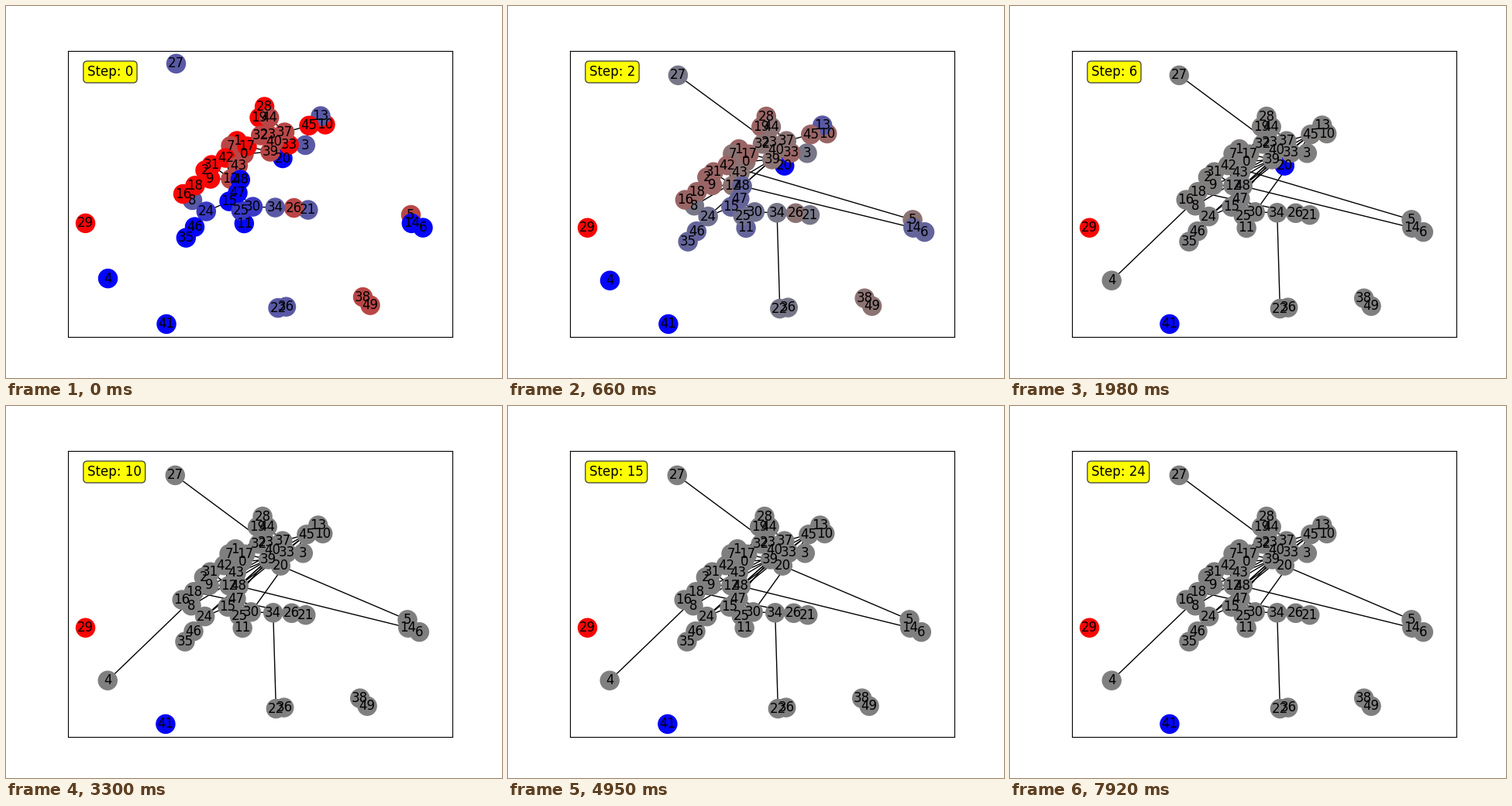
A matplotlib script that plays this animation: 640x480 px, repeating every 8 s.

```python
import itertools
import numpy as np
import matplotlib.pyplot as plt
from matplotlib.animation import FuncAnimation
from matplotlib.collections import LineCollection

plt.rcParams["font.family"] = "DejaVu Sans"

LOOP, TICK, STEP = 8000, 40, 330
REACH = 34.3        # nodes closer than this start out linked
DECAY = .47         # share of an opinion kept per step
NEVER = 99

# the layout: one place per node, y downwards
XY = np.array([
    (307, 191), (298, 174), (257, 212), (386.3, 179.5), (131.5, 351.5),
    (522.5, 269.5), (538, 286), (290, 180.5), (240.5, 250.5), (263.7, 223),
    (412, 153), (307.3, 280.5), (290, 223.3), (406, 142), (523.3, 280.3),
    (288, 252), (228.5, 242.5), (311, 181), (244, 231.7), (327, 144),
    (357, 196.5), (389.8, 263), (351, 389.5), (338, 165.5), (258.3, 265),
    (303.3, 264), (371.5, 260.5), (219.5, 74.4), (333.5, 130), (102.5, 280.3),
    (318.5, 259), (265.3, 205), (328.7, 167), (365.2, 179), (347.3, 260),
    (232.3, 299), (361.5, 388), (359.5, 163), (460.5, 375.5), (341, 188),
    (346, 175), (207, 410.3), (283.3, 196), (299.3, 206), (339.7, 144),
    (391, 154.3), (243.5, 285), (299, 241), (302.3, 224), (470, 386),
]) * (1, -1)

# opinions run from -1 (blue) over 0 (grey) to 1 (red); most nodes are red
OPINION = np.full(len(XY), .95)
OPINION[[0, 5, 7, 12, 23, 26, 32, 37, 38, 39, 40, 43, 44, 49]] = .45
OPINION[[3, 8, 13, 21, 22, 27, 34, 36]] = -.3
OPINION[[24, 25, 30]] = -.55
OPINION[[4, 6, 11, 14, 15, 20, 35, 41, 46, 47, 48]] = -.96

# step at which a node that starts alone finds company
JOIN = {4: 3, 13: 3, 20: 7, 29: NEVER, 41: NEVER}


def near_links():
    return [(a, b) for a, b in itertools.combinations(range(len(XY)), 2)
            if 20 not in (a, b) and np.hypot(*(XY[a] - XY[b])) < REACH]


def fan(left, right):
    return list(itertools.product(left, right))


# links that appear at each step
LINKS = {
    0: near_links(),
    1: [(48, 14), (34, 22)],
    2: [(27, 23)] + fan((8, 24, 48), (39,)),
    3: [(4, 44), (18, 26), (30, 45)] + fan((9, 15), (39,)) + fan((24, 43, 48), (45,)),
}


def links_at(step):
    pairs = [p for start, group in LINKS.items() if start <= step for p in group]
    if step > 0:
        pairs.append((42, 5) if step < JOIN[20] else (20, 5))
    return pairs


def opinions_at(step):
    now = OPINION * DECAY ** step
    for node, join in JOIN.items():
        now[node] = OPINION[node] * .05 ** max(0, step - join + 1)
    return now


def colours(op):
    grey = .5 * (1 - np.abs(op))
    red = np.where(op > 0, .5 + .5 * op, grey)
    blue = np.where(op < 0, .5 - .5 * op, grey)
    return np.column_stack([red, grey, blue])


def view(pairs):
    """Limits around all nodes and the padded box of the links."""
    ends = XY[np.array(pairs).ravel()]
    lo, hi = ends.min(axis=0), ends.max(axis=0)
    pad = .05 * (hi - lo)
    lo = np.minimum(XY.min(axis=0), lo - pad)
    hi = np.maximum(XY.max(axis=0), hi + pad)
    margin = .05 * (hi - lo)
    return lo - margin, hi + margin


fig, ax = plt.subplots(figsize=(6.4, 4.8), dpi=100)
ax.set_xticks([])
ax.set_yticks([])
lines = ax.add_collection(LineCollection([], colors="black", linewidths=1, zorder=1))
dots = ax.scatter(*XY.T, s=300, c=colours(OPINION), zorder=2)
for i, (x, y) in enumerate(XY):
    ax.text(x, y, str(i), size=12, ha="center", va="center", zorder=3)
label = ax.text(.05, .95, "", transform=ax.transAxes, size=12, va="top", zorder=4,
                bbox=dict(boxstyle="round", facecolor="yellow", edgecolor="#4d4d4d"))


def draw(i):
    step = (i * TICK + TICK - 1) // STEP
    pairs = links_at(step)
    lines.set_segments([XY[list(p)] for p in pairs])
    dots.set_facecolor(colours(opinions_at(step)))
    dots.set_edgecolor("face")
    lo, hi = view(pairs)
    ax.set_xlim(lo[0], hi[0])
    ax.set_ylim(lo[1], hi[1])
    label.set_text(f"Step: {step}")
    return lines, dots, label


anim = FuncAnimation(fig, draw, frames=LOOP // TICK, interval=TICK,
                     repeat=True, repeat_delay=0, blit=False)
plt.show()
```
